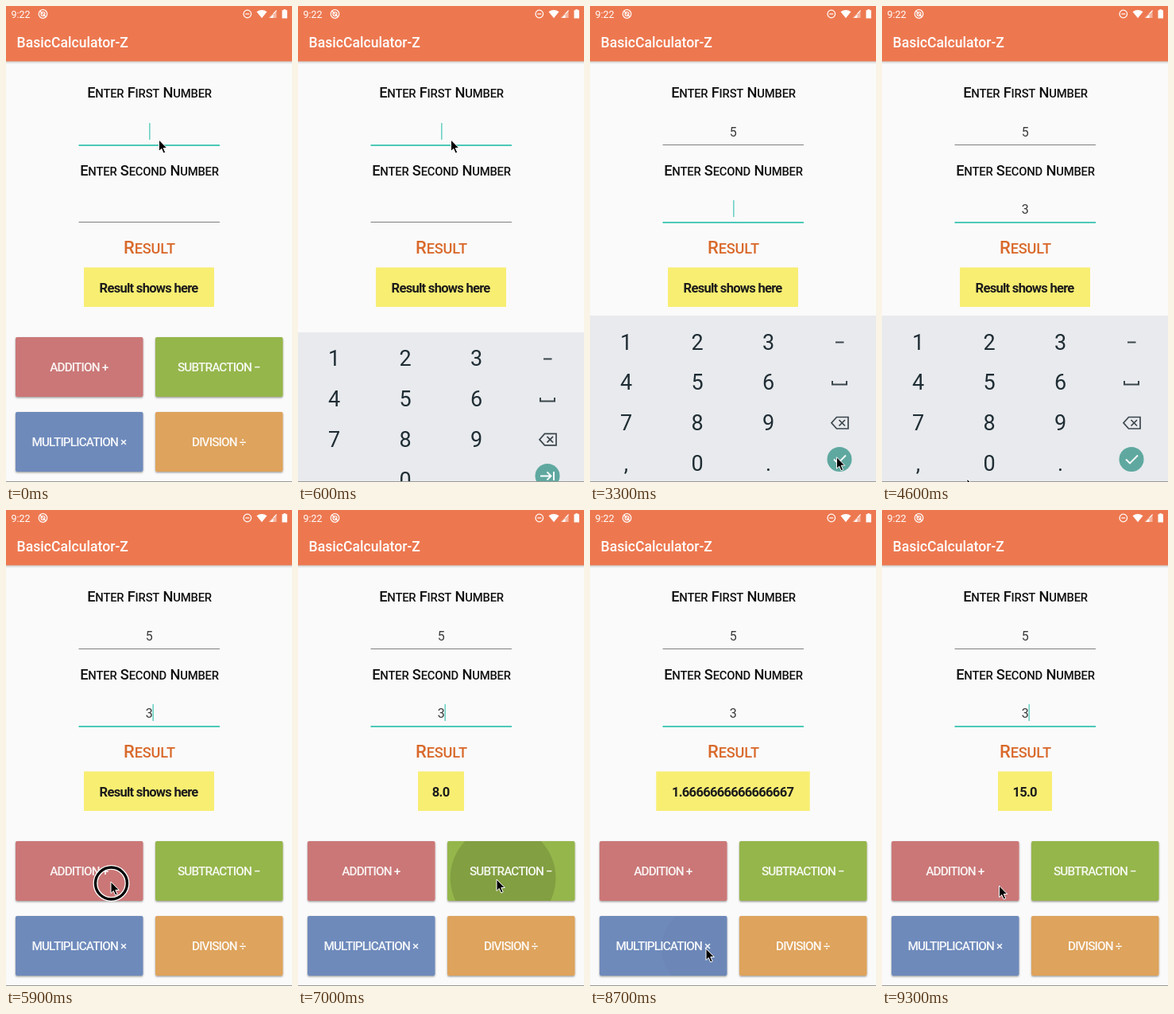
These frames come from a looping animation (360x598 px, 9400 ms). An HTML page:

```html
<!DOCTYPE html>
<html lang="en">
<head>
<meta charset="utf-8">
<style>
html, body { margin: 0; width: 100%; height: 100%; overflow: hidden; background: #fafafa; }
svg { display: block; width: 360px; height: 598px; }
text { font-family: Roboto, sans-serif; }
.caps, .btn, .result, .key, .field { text-anchor: middle; }
.caps { font-weight: 500; letter-spacing: -.2px; }
.btn { font-weight: 500; font-size: 15.3px; letter-spacing: -.85px; fill: #fff; fill-opacity: .92; }
.result { font-weight: 700; font-size: 16.6px; letter-spacing: -.75px; fill: #1c1c1c; }
.key { font-size: 27px; fill: #1f2d34; }
.field { font-size: 16px; fill: #3a3a3a; }
</style>
</head>
<body>
<svg id="stage" viewBox="0 0 360 598" xmlns="http://www.w3.org/2000/svg">
  <defs>
    <filter id="shade" x="-10%" y="-10%" width="120%" height="130%">
      <feDropShadow dx="0" dy="1.2" stdDeviation="1.2" flood-color="#000" flood-opacity=".4"/>
    </filter>
    <linearGradient id="under" x2="0" y2="1">
      <stop stop-color="#000" stop-opacity=".2"/><stop offset="1" stop-color="#000" stop-opacity="0"/>
    </linearGradient>
  </defs>
  <rect width="360" height="598" fill="#fafafa"/>
  <rect y="69" width="360" height="4" fill="url(#under)"/>
  <rect width="360" height="69.5" fill="#ed7850"/>
  <g fill="#fff">
    <text x="6.5" y="15" font-size="12.5">9:22</text>
    <text x="13.6" y="52" font-size="17.6" font-weight="500">BasicCalculator-Z</text>
    <path d="M315.5 7.3Q322 2.5 328.5 7.3L322 15.3Z"/>
    <path d="M340.5 5V15H330.5Z" fill-opacity=".45"/>
    <path d="M336.5 9V15H330.5ZM340.5 5L330.5 15H332L340.5 6.5Z"/>
    <path d="M347.5 5.3H349.3V4.2H352.2V5.3H354V15.5H347.5Z"/>
  </g>
  <g fill="none" stroke="#fff" stroke-width="1.2">
    <circle cx="46.5" cy="10" r="5.3"/>
    <circle cx="46.5" cy="10" r="2.5"/>
    <path d="M42.8 6.3L50.2 13.7"/>
    <circle cx="303.8" cy="10" r="4.8"/>
    <path d="M301.3 10H306.3"/>
  </g>
  <g id="labels"></g>
  <g id="fields"></g>
  <rect id="box" y="328.5" height="49.5" fill="#f8ee72"/>
  <text id="out" class="result" x="179.6" y="360.2"></text>
  <g id="buttons"></g>
  <g id="pad">
    <rect y="389" width="360" height="209" fill="#e8eaed"/>
    <g id="keys"></g>
    <g fill="none" stroke="#3a464c" stroke-width="2">
      <path d="M309 422.5H319.5"/>
      <path d="M305 471V475.5H323V471"/>
      <path d="M310.5 516.5H325V531H310.5L304 523.7ZM313.5 520L321 527.5M321 520L313.5 527.5" stroke-width="1.7"/>
    </g>
    <circle cx="314" cy="569.5" r="15.5" fill="#5fa8a0"/>
    <g fill="none" stroke="#fff" stroke-width="1.9">
      <path id="next" d="M305 569.5H318M313.5 564.5L318.5 569.5L313.5 574.5M322 564V575"/>
      <path id="done" d="M307 569.5L312 574.5L322 564.5"/>
    </g>
  </g>
  <rect y="597" width="360" height="1" fill="#999"/>
  <g id="ring" fill="none">
    <circle r="20" stroke="#fff" stroke-width="6"/>
    <circle r="20" stroke="#000" stroke-width="3.4"/>
  </g>
  <path id="mouse" d="M0 0V14.5L3.3 11.5L5.7 17L8.2 15.9L5.8 10.5H10.3Z" fill="#000" stroke="#fff" stroke-width="1"/>
</svg>
<script>
const LOOP = 9400, TEAL = '#4cc9b8';
const $ = id => document.getElementById(id);

function add(parent, tag, attrs, text) {
  const el = document.createElementNS('http://www.w3.org/2000/svg', tag);
  set(el, attrs);
  if (text !== undefined) el.textContent = text;
  parent.appendChild(el);
  return el;
}
function set(el, attrs) { for (const k in attrs) el.setAttribute(k, attrs[k]); }
function show(el, on) { el.style.display = on ? '' : 'none'; }
const clamp = v => Math.max(0, Math.min(1, v));
const mix = (a, b, p) => a + (b - a) * p;
const smooth = p => p * p * (3 - 2 * p);

// Small capitals: first letters larger than the rest
function caps(text, y, size, small, fill) {
  const el = add($('labels'), 'text', { class: 'caps', x: 180.5, y, fill });
  text.split(' ').forEach((word, i) => {
    add(el, 'tspan', { 'font-size': size }, (i ? ' ' : '') + word[0]);
    add(el, 'tspan', { 'font-size': small }, word.slice(1).toUpperCase());
  });
}
caps('Enter First Number', 114.5, 18.3, 14.8, '#111');
caps('Enter Second Number', 212.5, 18.3, 14.8, '#111');
caps('Result', 311, 22, 18.2, '#d9692b');

const fields = [174, 271].map(y => ({
  line: add($('fields'), 'rect', { x: 91.5, y, width: 177.5 }),
  text: add($('fields'), 'text', { class: 'field', x: 180.2, y: y - 10 }),
  caret: add($('fields'), 'rect', { y: y - 27, width: 1.3, height: 21, fill: TEAL })
}));

const buttons = [
  ['ADDITION +', 12, 416, '#cb7777', 6000, 132, 467],
  ['SUBTRACTION −', 188, 416, '#95b64b', 6900, 250, 469],
  ['DIVISION ÷', 188, 510, '#dea35b', 7800, 294, 556],
  ['MULTIPLICATION ×', 12, 510, '#6e8abb', 8690, 146, 551]
].map(([label, x, y, fill, start, px, py], i) => {
  const g = $('buttons'), size = { x, y, width: 160.5, height: 75, rx: 2 };
  add(add(g, 'clipPath', { id: 'clip' + i }), 'rect', size);
  add(g, 'rect', { ...size, fill, filter: 'url(#shade)' });
  const wave = add(g, 'circle', { 'clip-path': `url(#clip${i})` });
  add(g, 'text', { class: 'btn', x: x + 79.8, y: y + 42.8 }, label);
  return { wave, start, px, py, cx: x + 80, cy: y + 37.5 };
});

['123', '456', '789', ',0.'].forEach((row, r) => [...row].forEach((c, i) =>
  add($('keys'), 'text', { class: 'key', x: 45.5 + 89.5 * i, y: 431.5 + 50.8 * r }, c)));

// time, x, y of the pointer
const path = [
  [0, 192.5, 168], [800, 192.5, 168], [1900, 156, 455], [2150, 137, 472], [2500, 137, 472],
  [3000, 313, 571], [3250, 313, 571], [3750, 225, 424], [4000, 225, 424], [4600, 107, 594],
  [4750, 101, 612], [5150, 101, 612], [5700, 132, 467], [6100, 132, 467], [6700, 250, 464],
  [7100, 250, 464], [7600, 294, 556], [7950, 294, 556], [8450, 146, 551], [8800, 146, 551],
  [9300, 147.5, 472], [LOOP, 147.5, 472]
];
function pointer(t) {
  const i = path.findIndex(k => k[0] > t);
  const a = path[i - 1], b = path[i], p = smooth((t - a[0]) / (b[0] - a[0]));
  return [mix(a[1], b[1], p), mix(a[2], b[2], p)];
}

const clicks = [150, 2250, 3050, 3800, 5850, 6750, 7650, 8530];
// start, value, box width
const results = [
  [8860, '15.0', 68], [7980, '1.6666666666666667', 193.5], [7080, '2.0', 58],
  [6180, '8.0', 58], [0, 'Result shows here', 164]
];

function draw(t) {
  const active = t < 3150 ? 0 : 1;
  const typed = [t >= 2400 ? '5' : '', t >= 3900 ? '3' : ''];
  const blink = [3900, 3150, 2400, 200, 0].find(s => t >= s);
  fields.forEach((f, i) => {
    const on = i === active;
    set(f.line, { height: on ? 2 : 1, fill: on ? TEAL : '#808080' });
    f.text.textContent = typed[i];
    f.caret.setAttribute('x', typed[i] ? 184.5 : 180.2);
    show(f.caret, on && (t - blink) % 1000 < 500);
  });

  const [, value, width] = results.find(r => t >= r[0]);
  $('out').textContent = value;
  set($('box'), { x: 180 - width / 2, width });

  for (const b of buttons) {
    const age = t - b.start, p = clamp(age / 225);
    show(b.wave, age >= 0 && age < 450);
    set(b.wave, {
      cx: mix(b.px, b.cx, p), cy: mix(b.py, b.cy, p), r: mix(52, 84, p),
      opacity: .13 * clamp(age / 80) * clamp((450 - age) / 225)
    });
  }

  const rise = smooth(clamp((t - 400) / 250)) - smooth(clamp((t - 5080) / 220));
  show($('pad'), rise > 0);
  $('pad').setAttribute('transform', `translate(0 ${209 * (1 - rise)})`);
  show($('next'), !active);
  show($('done'), active);

  const [x, y] = pointer(t);
  $('mouse').setAttribute('transform', `translate(${x} ${y})`);
  $('ring').setAttribute('transform', `translate(${x + .5} ${y + 2})`);
  show($('ring'), clicks.some(c => t >= c && t < c + 150));
}

const begin = performance.now();
function tick() {
  draw((performance.now() - begin) % LOOP);
  requestAnimationFrame(tick);
}
draw(0);
tick();
</script>
</body>
</html>
```
